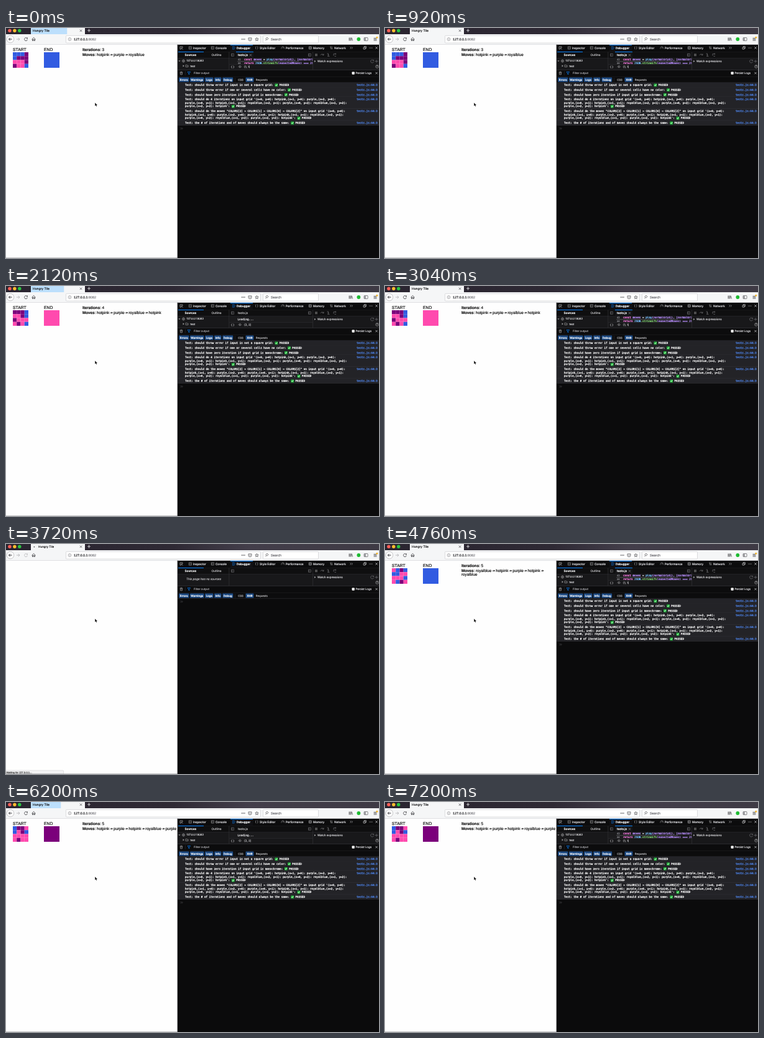
Animation of 600 by 370 pixels, one loop 7240 ms. Source, as an HTML page with a canvas:

```html
<!DOCTYPE html>
<html lang="en">
<head>
<meta charset="utf-8">
<title>Hungry Tile</title>
<style>
html, body { margin: 0; width: 100%; height: 100%; overflow: hidden; background: #fefefe; }
canvas { display: block; width: 600px; height: 370px; }
</style>
</head>
<body>
<canvas id="stage"></canvas>
<script>
const LOOP = 7240;
const TITLE = 'Hungry Tile';
const UI = 'Inter, "Liberation Sans", sans-serif';
const SANS = '"Liberation Sans", Arial, sans-serif';
const MONO = '"DejaVu Sans Mono", monospace';
const BLUE = '#0a84ff', GREY = '#b1b1b3', DIM = '#77777c', LINE = '#38383d';
const HUES = { B: '#315be1', H: '#ff4aae', P: '#7b007b' };

const runs = [
  { start: -540, load: -100, cells: 'BBBP BPPP HHHP PHHB', end: 'B',
    moves: ['hotpink purple royalblue'] },
  { start: 1600, load: 2040, cells: 'PPPB HHPB PHHH HPHB', end: 'H',
    moves: ['hotpink purple royalblue hotpink'] },
  { start: 3600, load: 4040, cells: 'HBPB BBHH HHHB HBPH', end: 'B',
    moves: ['royalblue hotpink purple hotpink ', 'royalblue'] },
  { start: 5580, load: 6140, cells: 'BPPH BHPB HHHH HPHH', end: 'P',
    moves: ['hotpink purple hotpink royalblue purple'] }
];

const PASS = '✅';
const logs = [
  { y: 88, h: 7.7, lines: ['Test: should throw error if input is not a square grid: ' + PASS] },
  { y: 95.7, h: 7.7, lines: ['Test: should throw error if one or several cells have no color: ' + PASS] },
  { y: 103.4, h: 7.7, lines: ['Test: should have zero iteration if input grid is monochrome: ' + PASS] },
  { y: 111.1, h: 18.9, lines: [
    "Test: should do 4 iterations on input grid '(x=0, y=0): hotpink,(x=1, y=0): purple,(x=2, y=0):",
    'purple,(x=0, y=1): hotpink,(x=1, y=1): royalblue,(x=2, y=1): purple,(x=0, y=2): royalblue,(x=1, y=2):',
    "purple,(x=2, y=2): hotpink': " + PASS] },
  { y: 130, h: 18.9, lines: [
    'Test: should do the moves "COLORS[2] → COLORS[1] → COLORS[0] → COLORS[2]" on input grid \'(x=0, y=0):',
    'hotpink,(x=1, y=0): purple,(x=2, y=0): purple,(x=0, y=1): hotpink,(x=1, y=1): royalblue,(x=2, y=1):',
    "purple,(x=0, y=2): royalblue,(x=1, y=2): purple,(x=2, y=2): hotpink': " + PASS] },
  { y: 148.9, h: 7.7, lines: ['Test: the # of iterations and of moves should always be the same: ' + PASS] }
];

const canvas = document.getElementById('stage');
const ctx = canvas.getContext('2d');
const ratio = window.devicePixelRatio || 1;
canvas.width = 600 * ratio;
canvas.height = 370 * ratio;

function box(x, y, w, h, color) {
  ctx.fillStyle = color;
  ctx.fillRect(x, y, w, h);
}

function round(x, y, w, h, r, fill, stroke) {
  ctx.beginPath();
  ctx.roundRect(x, y, w, h, r);
  if (fill) { ctx.fillStyle = fill; ctx.fill(); }
  if (stroke) { ctx.strokeStyle = stroke; ctx.lineWidth = 0.6; ctx.stroke(); }
}

function disc(x, y, r, fill, stroke, width = 0.6) {
  ctx.beginPath();
  ctx.arc(x, y, r, 0, Math.PI * 2);
  if (fill) { ctx.fillStyle = fill; ctx.fill(); }
  if (stroke) { ctx.strokeStyle = stroke; ctx.lineWidth = width; ctx.stroke(); }
}

// Draws an SVG path with its origin at x, y.
function icon(d, x, y, color, width = 0.7, fill = false) {
  ctx.save();
  ctx.translate(x, y);
  const path = new Path2D(d);
  if (fill) { ctx.fillStyle = color; ctx.fill(path); }
  else { ctx.strokeStyle = color; ctx.lineWidth = width; ctx.stroke(path); }
  ctx.restore();
}

// Writes text centred on y, a little heavier than regular, and returns where it ends.
function text(s, x, y, size, color, family = UI, style = '') {
  ctx.font = `${style} ${size}px ${family}`;
  ctx.fillStyle = ctx.strokeStyle = color;
  ctx.lineWidth = family === MONO ? 0.28 : 0.18;
  ctx.fillText(s, x, y);
  ctx.strokeText(s, x, y);
  return x + ctx.measureText(s).width;
}

function clipped(x, y, w, h, draw) {
  ctx.save();
  ctx.beginPath();
  ctx.rect(x, y, w, h);
  ctx.clip();
  draw();
  ctx.restore();
}

const CROSS = 'M-1.7-1.7L1.7 1.7M1.7-1.7L-1.7 1.7';
const PLUS = 'M-2.5 0H2.5M0-2.5V2.5';
const REFRESH = 'M2.1-1.4A2.5 2.5 0 1 0 2.5.7M2.5-2.6V-.9H.8';
const LENS = 'M1.6-.6A1.7 1.7 0 1 1 1.6-.7M-1.2.8L-2.7 2.4';
const TRI = 'M-.9-1.5L1.3 0L-.9 1.5Z';
const FUNNEL = 'M-2.2-2H2.2L.6 .2V2.2L-.6 1.6V.2Z';
const PANES = 'M-2-2H2V2H-2ZM-.6-2V2';
const ARROW = 'M0-.4H2.4V-1.5L4.6 0L2.4 1.5V.4H0Z';
const POINTER = 'M0 0V5.1L1.2 4L2.1 5.9L3 5.5L2.1 3.7H3.7Z';

function titleBar(s) {
  const g = ctx.createLinearGradient(0, 0, 600, 0);
  g.addColorStop(0, '#2a2530');
  g.addColorStop(0.45, '#2e2934');
  g.addColorStop(0.65, '#433e4a');
  g.addColorStop(1, '#3e3a44');
  box(0, 0, 600, 10, g);
  ['#ff5f57', '#febc2e', '#28c840'].forEach((c, i) => disc(6 + i * 7.9, 4.2, 2.7, c));
  box(40, 0, 87, 10.5, '#f5f6f7');
  if (s.burst >= 0 && s.burst < 375) {
    const w = Math.min(87, 38 + s.burst / 4);
    ctx.globalAlpha = Math.min(1, (375 - s.burst) / 280);
    box(40, 0, w, 10, '#bcdffc');
    ctx.globalAlpha = 1;
  }
  if (s.phase === 'done') text(TITLE, 43, 4.6, 4.9, '#18181a');
  else {
    disc(45.5 - 2 * Math.cos(s.dt * Math.PI / 250), 4.6, 0.9, '#4a4a4f');
    if (s.phase === 'blank') text(TITLE, 52, 4.6, 4.6, '#18181a');
  }
  icon(CROSS, 120.5, 4.3, '#38383d', 0.7);
  icon(PLUS, 133.5, 4, '#e8e8ea', 0.8);
}

function navBar(s) {
  const ink = '#3a3a3e';
  box(0, 10, 600, 16.5, '#f5f6f7');
  box(0, 26, 600, 0.5, '#cfcfd2');
  disc(7, 18, 5.8, '#fff', '#a5a5a8');
  icon('M2.6 0H-2.4M-.3-2.2L-2.5 0L-.3 2.2', 7, 18, ink, 1);
  icon('M-2.6 0H2.4M.3-2.2L2.5 0L.3 2.2', 19.5, 18, '#b5b5b8', 0.9);
  icon(REFRESH, 32, 18, s.phase === 'done' ? ink : '#b5b5b8', 0.8);
  icon('M-2.9 .2L0-2.6L2.9 .2M-2-.4V2.4H-.7V.5H.7V2.4H2V-.4', 44.5, 18, ink, 0.8);

  round(96.5, 12.3, 313, 11.8, 1, '#fff', '#c6c6ca');
  disc(102.5, 18, 2.4, null, '#77777c');
  box(102.2, 17.6, 0.6, 1.8, '#77777c');
  box(102.2, 16.4, 0.6, 0.6, '#77777c');
  const x = text('127.0.0.1', 109, 18.5, 5.4, '#101014', SANS);
  text(':8082', x, 18.5, 5.4, '#77777c', SANS);
  for (let i = 0; i < 3; i++) disc(379.5 + i * 2.2, 18, 0.8, ink);
  icon('M-2.5-2.3H2.5V0A2.5 2.5 0 0 1-2.5 0ZM-1.3-.6L0 .6L1.3-.6', 392.5, 18.2, ink);
  icon('M0-2.8L.8-.9L2.7-.8L1.2 .5L1.7 2.5L0 1.4L-1.7 2.5L-1.2 .5L-2.7-.8L-.8-.9Z', 403.5, 18.2, ink);

  round(413.5, 12.3, 89, 11.8, 1, '#fff', '#c6c6ca');
  icon(LENS, 420, 17.8, ink);
  text('Search', 426, 18.5, 5.4, '#66666b', SANS);

  icon('M-2.5-2.5V2.5M-.9-2.5V2.5M.7-2.5V2.5M1.5-2.4L3 2.5', 554.5, 18, ink, 0.8);
  disc(567.3, 18, 2.9, '#1ebb32');
  round(576, 15.5, 6, 5, 0.7, null, ink);
  box(576.5, 16.2, 2.1, 3.7, '#85858a');
  icon('M-2.5-1.8H2.5M-2.5 0H2.5M-2.5 1.8H2.5', 594, 18.2, ink, 0.8);
  disc(596.8, 15.2, 1.5, '#f5b72c');
}

function movesText(words, x, y) {
  words.split(' ').forEach((word, i) => {
    if (i) {
      icon(ARROW, x + 1.2, y + 0.3, '#111', 1, true);
      x += 6.9;
    }
    x = text(word, x, y, 6.25, '#111', SANS);
  });
}

function page(s) {
  box(0, 26.5, 276, 344, '#fefefe');
  if (s.phase === 'blank') {
    round(-1, 364.2, 93.5, 8, 1, '#f3f3f4', '#d0d0d3');
    text('Waiting for 127.0.0.1...', 0.5, 368.2, 4.1, '#333', SANS);
  } else {
    const run = s.run;
    text('START', 11, 35.4, 6.8, '#111', SANS);
    text('END', 61, 35.4, 6.8, '#111', SANS);
    run.cells.split(' ').forEach((row, j) => [...row].forEach((c, i) =>
      box(11 + i * 6.25, 39 + j * 6.25, 6.25, 6.25, HUES[c])));
    box(61, 39, 25, 25, HUES[run.end]);
    const count = run.moves.join('').split(' ').length;
    let x = text('Iterations', 123, 35.6, 6.25, '#111', SANS, 'bold');
    text(': ' + count, x, 35.6, 6.25, '#111', SANS);
    x = text('Moves', 123, 42.8, 6.25, '#111', SANS, 'bold');
    x = text(': ', x, 42.8, 6.25, '#111', SANS);
    movesText(run.moves[0], x, 42.8);
    if (run.moves[1]) movesText(run.moves[1], 123, 49.6);
  }
  icon(POINTER, 143.2, 120.3, '#fff', 1);
  icon(POINTER, 143.2, 120.3, '#111', 1, true);
  box(0, 369.5, 276, 0.5, '#88888c');
}

function toolTabs() {
  box(276, 26.5, 324, 12, '#0c0c0d');
  box(361, 27, 36, 11, '#111114');
  box(361, 27, 36, 1, BLUE);
  icon('M-2-2H2V0M-2-2V2H0M0 0L2.5 2.5M0 0V1.6M0 0H1.6', 282, 32, GREY);
  const tabs = [
    ['Inspector', 301, 'M-2-2H2V2H-2ZM-1 0H1'],
    ['Console', 337, 'M-2-2H2V2H-2ZM-1-.8L0 0L-1 .8'],
    ['Debugger', 371, 'M-2-2H.8L2.4 0L.8 2H-2L-.7 0Z'],
    ['Style Editor', 408, 'M-.8-2.2Q-2-2-1.8 0Q-2 2-.8 2.2M.8-2.2Q2-2 1.8 0Q2 2 .8 2.2'],
    ['Performance', 450, 'M-2.2 1.5A2.4 2.4 0 1 1 2.2 1.5M0 .8L1-1'],
    ['Memory', 494, 'M-1.8-2H1.8V2H-1.8ZM-2.5-1H2.5M-2.5 1H2.5'],
    ['Network', 528, 'M-1-2V2M-2-1L-1-2L0-1M1-2V2M0 1L1 2L2 1']
  ];
  for (const [name, x, d] of tabs) {
    const on = name === 'Debugger';
    icon(d, x - 4.7, 32, on ? BLUE : GREY, 0.6);
    text(name, x, 32.3, 4.6, on ? '#fff' : '#d7d7db', UI, on ? '600' : '500');
  }
  icon('M-2-1.6L-.4 0L-2 1.6M.4-1.6L2 0L.4 1.6', 555.5, 32, GREY);
  icon('M-2-1H1V2H-2ZM-.6-1V-2.3H2.3V.8H1', 577, 32, '#d0d0d3');
  for (let i = 0; i < 3; i++) disc(585 + i * 2, 32, 0.55, '#d0d0d3');
  icon(CROSS, 596, 32, '#d0d0d3');
  box(276, 38, 324, 0.5, LINE);
}

function codeLine(parts, y) {
  let x = 383;
  for (const [s, color] of parts) x = text(s, x, y, 4.3, color, MONO);
}

function sources(s) {
  const blank = s.phase === 'blank';
  box(276, 38.5, 324, 29, '#18181a');
  box(276, 38.5, 324, 10, '#0f0f10');
  box(277, 38, 41, 1, BLUE);
  text('Sources', 287.5, 43.6, 4.7, '#fff', UI, '600');
  text('Outline', 330.5, 43.6, 4.7, GREY, UI, '500');
  box(276, 48.2, 324, 0.4, LINE);

  if (blank) {
    text('This page has no sources', 290, 56.2, 4.6, '#c0c0c4', UI, 'italic');
  } else {
    icon('M-1.6-.6L0 1L1.6-.6Z', 279, 53, GREY, 1, true);
    disc(285.5, 53, 2, null, GREY);
    icon('M-2 0H2M0-2V2', 285.5, 53, GREY, 0.4);
    text('127.0.0.1:8082', 290.5, 53.1, 4.2, '#d0d0d3');
    icon(TRI, 285.5, 61, GREY, 1, true);
    icon('M-2-1.5H-.5L0-.9H2V1.6H-2Z', 291, 61, GREY, 0.6);
    text('test', 296.5, 61.2, 4.4, '#d0d0d3');
  }

  box(358.6, 38.5, 0.6, 29, LINE);
  icon(PANES, 364.5, 43.3, DIM, 0.6);
  icon(PANES, 488.5, 43.3, DIM, 0.6);
  if (!blank) {
    if (s.code) {
      box(370, 38.5, 28, 9.8, '#151517');
      box(370, 38, 28, 1, BLUE);
      icon(CROSS, 393.5, 43.5, GREY, 0.5);
    }
    text('tests.js', 373, 43.6, 4.7, s.code ? '#fff' : GREY, UI, '500');
    clipped(359.2, 48.5, 134, 9.6, () => {
      box(359.2, 48.5, 134, 10, '#1b1b1d');
      if (!s.code) {
        text('Loading...', 372.5, 53.5, 4.3, '#d0d0d3', MONO);
        return;
      }
      text('43', 373, 51, 3.8, DIM, MONO);
      text('44', 373, 56.6, 3.8, DIM, MONO);
      codeLine([['const ', '#ff7de9'], ['moves ', '#b98eff'], ['= ', '#d7d7db'],
        ['play', '#75bfff'], ['(normalGrid(), [normalGrid()', '#b98eff']], 51);
      codeLine([['return ', '#ff7de9'], ['JSON', '#75bfff'], ['.stringify', '#86de74'],
        ['(expectedMoves) === JSON', '#b98eff']], 56.6);
      round(372, 53.2, 100, 1.4, 0.7, 'rgba(150,150,155,.35)');
    });
    box(359.2, 58, 134, 0.4, LINE);
    text('{ }', 362, 62.3, 4.5, GREY);
    icon('M-2.5 0Q0-3.3 2.5 0Q0 3.3-2.5 0Z', 376.3, 62.2, GREY, 0.5);
    disc(376.3, 62.2, 0.8, GREY);
    text(s.code ? '(1, 1)' : '(2, 2)', 383, 62.4, 4.5, '#c0c0c4');
  }

  box(493.5, 38.5, 0.6, 29, LINE);
  icon('M-1-2V2M1-2V2', 499, 43.3, GREY, 0.8);
  icon('M-2.3 .8A2.4 2.4 0 0 1 2.2 .4M2.5-1.6V.6H.4', 508.5, 43, DIM);
  icon('M-2-2H0V1M-1 0L0 1.2L1 0M-1.4 2.3H2', 518.5, 43.2, DIM);
  icon('M-2 1.5V-1.5H2M.8-2.5L2-1.5L.8-.4M-.5 2.2H2', 529, 43.2, DIM);
  icon(TRI, 497, 53.5, GREY, 1, true);
  text('Watch expressions', 501, 53.8, 4.55, '#d0d0d3');
  icon(REFRESH, 589, 53.5, DIM, 0.6);
  icon(PLUS, 596, 53.5, DIM, 0.6);
  disc(597, 62, 2.4, null, GREY);
  text('?', 596, 62.3, 3.6, GREY);
}

function consoleBar() {
  box(276, 67.3, 324, 20.7, '#0c0c0d');
  box(276, 67, 324, 0.6, LINE);
  icon('M-1.8-1H1.8L1.4 2.4H-1.4ZM-2.3-1.6H2.3M-.7-2.4H.7M0-.2V1.6', 282, 72.6, GREY, 0.6);
  box(288, 69, 0.4, 7, LINE);
  icon(FUNNEL, 294.3, 72.6, BLUE, 0.7);
  text('Filter output', 302, 72.9, 4.4, '#a0a0a5');
  round(556.5, 70.5, 4.2, 4.2, 0.7, '#fff');
  text('Persist Logs', 562.5, 72.9, 4.4, '#d7d7db');
  icon(CROSS, 596, 72.6, '#d0d0d3');
  box(276, 78, 324, 0.4, '#29292d');
  const filters = [['Errors', 278, 16.5], ['Warnings', 296, 22.5], ['Logs', 320, 13.5],
    ['Info', 335, 11.5], ['Debug', 348.3, 17], ['CSS', 371, 13], ['XHR', 385.5, 13],
    ['Requests', 400, 22.5]];
  ctx.textAlign = 'center';
  for (const [name, x, w] of filters) {
    const on = name !== 'CSS' && name !== 'Requests';
    if (on) round(x, 79.6, w, 7.1, 0.9, '#1c4a84');
    text(name, x + w / 2, 83.4, 4.35, on ? '#fff' : GREY, UI, on ? '600' : '400');
  }
  ctx.textAlign = 'left';
  box(368, 80, 0.4, 6.5, LINE);
  box(276, 87.6, 324, 0.5, LINE);
}

function passed(x, y) {
  round(x + 0.2, y - 2.5, 4.8, 4.8, 0.8, '#20b53a');
  icon('M-1.4 0L-.4 1.2L1.4-1.3', x + 2.6, y - 0.1, '#fff', 0.8);
  text('PASSED', x + 7.4, y, 4.29, '#fff', MONO);
}

function consoleBody(s) {
  box(276, 88, 324, 282, '#0b0b0c');
  let prompt = 92.7;
  if (s.phase === 'done') {
    prompt = 161.7;
    for (const { y, h, lines } of logs) {
      box(276, y, 324, h, '#232327');
      box(276, y + h - 0.4, 324, 0.4, '#38383d');
      lines.forEach((line, i) => {
        const mid = y + 4 + i * 5.6;
        const end = text(line.replace(PASS, ''), 288, mid, 4.29, '#fff', MONO);
        if (line.endsWith(PASS)) passed(end, mid);
      });
      text('tests.js:64:3', 564, y + 4, 4.29, '#4f86ee', MONO);
    }
  }
  icon('M-1.8-1.5L-.3 0L-1.8 1.5M.2-1.5L1.7 0L.2 1.5', 282.5, prompt, '#5c5c61', 0.6);
}

function stateAt(t) {
  let n = runs.length - 1;
  while (runs[n].start > t) n--;
  const run = runs[n], dt = t - run.start;
  if (t >= run.load) {
    return { phase: 'done', run, dt, burst: t - run.load - 20, code: t >= run.load + 100 };
  }
  if (dt < 100) return { phase: 'clear', run: runs[n - 1], dt, burst: -1, code: true };
  return { phase: 'blank', run, dt, burst: -1, code: false };
}

function frame(now) {
  const s = stateAt(now % LOOP);
  ctx.setTransform(ratio, 0, 0, ratio, 0, 0);
  ctx.textBaseline = 'middle';
  ctx.textRendering = 'geometricPrecision';
  ctx.lineJoin = 'round';
  page(s);
  consoleBody(s);
  toolTabs();
  sources(s);
  consoleBar();
  titleBar(s);
  navBar(s);
  box(275.6, 26.5, 0.6, 344, LINE);
}

const begin = performance.now();
function tick() {
  frame(performance.now() - begin);
  requestAnimationFrame(tick);
}
tick();
</script>
</body>
</html>
```
